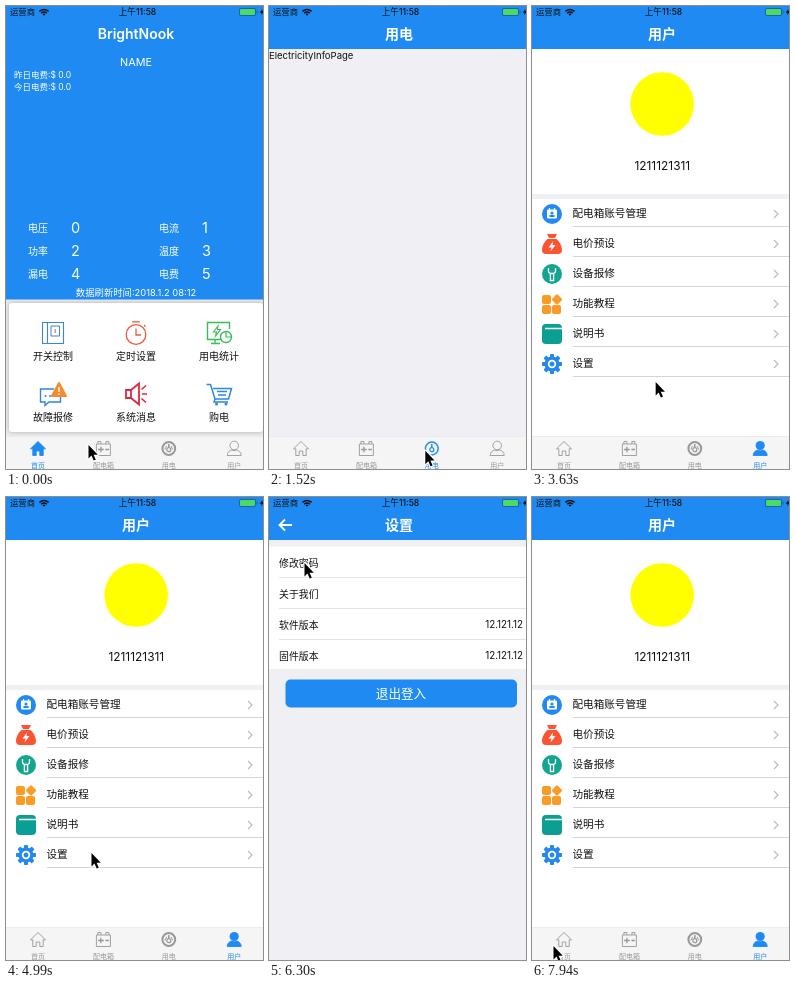
An HTML page with a canvas that plays this animation: 257 by 463 pixels, repeating every 8 s.

```html
<!DOCTYPE html>
<html lang="zh">
<head>
<meta charset="utf-8">
<style>
html, body { margin: 0; width: 100%; height: 100%; overflow: hidden; background: #fff; }
canvas { display: block; width: 257px; height: 463px; }
</style>
</head>
<body>
<canvas id="stage"></canvas>
<script>
const W = 257, H = 463, LOOP = 8000;
const BLUE = '#1f8bf2', GREY = '#efeff4', LINE = '#d4d4d6', INK = '#111', DIM = '#98989a';
const FONT = 'Inter, "Noto Sans CJK SC", "Noto Sans CJK", sans-serif';
const canvas = document.getElementById('stage');
const c = canvas.getContext('2d');
const dpr = window.devicePixelRatio || 1;
canvas.width = W * dpr;
canvas.height = H * dpr;

function rect(x, y, w, h, color, r = 0) {
  c.fillStyle = color;
  c.beginPath();
  c.roundRect(x, y, w, h, r);
  c.fill();
}

function disc(x, y, r, color) {
  c.fillStyle = color;
  c.beginPath();
  c.arc(x, y, r, 0, 7);
  c.fill();
}

function rule(x, y, color = LINE) {
  rect(x, y, W - x, 1, color);
}

// y is the vertical middle of the glyphs
function text(s, x, y, size, color = INK, align = 'left', weight = 400) {
  c.font = `${weight} ${size}px ${FONT}`;
  c.fillStyle = color;
  c.textAlign = align;
  c.fillText(s, x, y + size * 0.37);
}

function at(x, y, draw) {
  c.save();
  c.translate(x, y);
  draw();
  c.restore();
}

function stroke(d, color, w = 1) {
  c.strokeStyle = color;
  c.lineWidth = w;
  c.stroke(new Path2D(d));
}

function fill(d, color) {
  c.fillStyle = color;
  c.fill(new Path2D(d));
}

function ring(x, y, r, color, w = 1) {
  c.strokeStyle = color;
  c.lineWidth = w;
  c.beginPath();
  c.arc(x, y, r, 0, 7);
  c.stroke();
}

const BOLT = 'M1-5L-3.5 1H-.5L-1.5 5L3.5-1.5H.5Z';

// ---- status bar and header ----
function statusBar() {
  text('运营商', 4, 6, 8.4);
  at(38, 9, () => {
    stroke('M-4.6-3.6Q0-7.6 4.6-3.6M-2.8-1.8Q0-4.2 2.8-1.8', INK, 1.4);
    fill('M-1.5-.8Q0-2.2 1.5-.8L0 .8Z', INK);
  });
  text('上午11:58', 131.5, 6, 8.6, INK, 'center', 500);
  rect(233, 2, 17, 8, '#1a63b0', 2);
  rect(234, 3, 15, 6, '#4cd964', 1);
  rect(250.5, 4.5, 1, 3, '#1a63b0');
  at(256, 6, () => { c.scale(0.65, 0.65); fill(BOLT, INK); });
}

function title(s, alpha = 1) {
  c.globalAlpha = alpha;
  text(s, 130, 28, 14, '#fff', 'center', 600);
  c.globalAlpha = 1;
}

function header(page, push) {
  const late = Math.max(0, push * 2 - 1);
  rect(0, 0, W, 43, BLUE);
  statusBar();
  if (page < 3) title(['BrightNook', '配电箱', '用电'][page]);
  else {
    title('用户', 1 - push);
    title('设置', late);
  }
  if (page === 1) stroke('M237 27.5H250M243.5 21V34', '#fff', 1.1);
  if (late) {
    c.globalAlpha = late;
    stroke('M23 28H10.5M16 22.5L10.5 28L16 33.5', '#fff', 1.8);
    c.globalAlpha = 1;
  }
}

// ---- tab bar ----
const tabIcons = [
  (col, on) => {
    const d = 'M-7.5 .3L0-7L7.5 .3H5.2V7H1.8V2.5H-1.8V7H-5.2V.3Z';
    if (on) fill(d, col);
    stroke(d, col, 0.9);
  },
  (col, on) => {
    const body = 'M-7-4.5H7V7H-7ZM-5.5-4.5V-7H-2.5V-4.5M2.5-4.5V-7H5.5V-4.5';
    if (on) fill(body, col);
    stroke(body, col, 0.9);
    stroke('M-5.3 1H.3M-2.5-1.8V3.8M2 1H5.5', on ? '#fff' : col, 1.3);
  },
  (col, on) => {
    ring(0, 0, 6.4, col, on ? 1.5 : 2);
    ring(0, 1.2, 2, col, 1.2);
    stroke('M0-4.5V-.5', col, 1.5);
    if (!on) stroke('M-4 1L-2.2-2.6M4 1L2.2-2.6', col);
  },
  (col, on) => {
    const body = 'M-7 7C-7 3.6-4.5 2-2.4 1.5Q0 3 2.4 1.5C4.5 2 7 3.6 7 7Z';
    if (on) {
      disc(0, -3, 4.6, col);
      fill(body, col);
    } else ring(0, -3, 4.3, col, 0.9);
    stroke(body, col, 0.9);
  }
];

function tabBar(page) {
  rect(0, 430, W, 33, '#f5f5f6');
  rule(0, 430, '#ececee');
  ['首页', '配电箱', '用电', '用户'].forEach((label, i) => {
    const x = 32 + i * 65.4, col = i === page ? BLUE : DIM;
    at(x, 442.5, () => tabIcons[i](col, i === page));
    text(label, x, 459, 7, col, 'center');
  });
}

// ---- home ----
const homeIcons = [
  () => {
    stroke('M-10.5-10.5H10.5V10.5H-10.5ZM-5.5-10V10', '#3b86d8', 1.1);
    stroke('M-2-7H6.5V3H-2Z', '#3b86d8');
    stroke('M2.2-4V0', '#e5687a', 1.2);
  },
  () => {
    ring(0, 1.5, 9.8, '#ee5a3d', 1.3);
    stroke('M-4-11.2H4M0-4.5V2H5M8-8L9.5-6.5', '#ee5a3d', 1.3);
  },
  () => {
    stroke('M2 6.5H-11.5V-10.5H10.5V-4M-8 10.5H1M-4 6.5V10', '#36bf55', 1.4);
    at(-2, -2, () => stroke(BOLT, '#36bf55', 1.1));
    ring(7, 4, 5.5, '#36bf55', 1.4);
    stroke('M7-1V4H12', '#36bf55', 1.2);
  },
  () => {
    stroke('M1-5H-12.5V8H-8V11.5L-4 8H7.5V1', '#2d86df', 1.4);
    [-7.5, -3, 1.5].forEach(x => disc(x, 2, 1, '#2d86df'));
    c.lineJoin = 'round';
    fill('M6-11L13 2H-1Z', '#f78a2b');
    stroke('M6-11L13 2H-1Z', '#f78a2b', 2);
    stroke('M6-7V-2M6-.5V1', '#fff', 1.4);
  },
  () => {
    stroke('M-10-4H-5L3-10.5V10.5L-5 4H-10ZM-5-4V4', '#e0283e', 1.8);
    stroke('M5.5-4.5L10-8.5M6 0H11M5.5 4.5L10 8.5', '#e0283e', 1.6);
  },
  () => {
    stroke('M-12.5-9.5H-8.5L-4 5H9.5L12.5-5.5H-6M-4 5L-5 8H9', '#2d86df', 1.5);
    stroke('M-2-2.5H8M-1 1H7', '#2d86df', 1.3);
    disc(-2.5, 10, 1.5, '#2d86df');
    disc(7, 10, 1.5, '#2d86df');
  }
];

function home() {
  rect(0, 43, W, 251, BLUE);
  rect(0, 293.5, W, 170, '#ececee');
  text('NAME', 130, 56.5, 10.8, '#fff', 'center');
  text('昨日电费:$ 0.0', 8, 69, 8.5, '#fff');
  text('今日电费:$ 0.0', 8, 81, 8.5, '#fff');
  ['电压', '电流', '功率', '温度', '漏电', '电费'].forEach((s, i) => {
    const x = i % 2 * 131, y = 222 + (i >> 1) * 23;
    text(s, 22 + x, y, 10, '#fff');
    text(i, 65 + x, y, 14.5, '#fff');
  });
  text('数据刷新时间:2018.1.2 08:12', 130, 287, 9.35, '#fff', 'center');
  c.save();
  c.shadowColor = 'rgba(0,0,0,.28)';
  c.shadowBlur = 4 * dpr;
  rect(3, 297, 254, 129, '#fff', 3);
  c.restore();
  ['开关控制', '定时设置', '用电统计', '故障报修', '系统消息', '购电'].forEach((s, i) => {
    const x = 47 + i % 3 * 83, y = 327 + (i > 2 ? 61 : 0);
    at(x, y, homeIcons[i]);
    text(s, x, y + 23, 10, INK, 'center');
  });
}

// ---- boxes ----
function chevron(y) {
  stroke(`M242 ${y - 4}L246 ${y}L242 ${y + 4}`, '#b9b9bd', 1.1);
}

function boxes() {
  rect(0, 43, W, 420, '#fff');
  rect(0, 43, W, 6.5, GREY);
  rect(0, 79.5, W, 3.5, GREY);
  rect(10, 54, 20, 20, '#e79a2a', 4);
  at(20, 64, () => {
    stroke('M0-3V3M-5 3V0H5V3M-1.7-6H1.7V-3H-1.7Z', '#fdeccb', 0.9);
    [-5, 0, 5].forEach(x => stroke(`M${x - 1.4} 3H${x + 1.4}V5.5H${x - 1.4}Z`, '#fdeccb', 0.9));
  });
  rect(10, 87, 20, 20, '#12c645', 4);
  at(20, 97, () => stroke('M-6 1L-3.5-5H3.5L6 1V5H-6ZM-6 1H6M2 3H4', '#fff', 1.1));
  text('配电箱组 8', 40.5, 64.5, 10.4);
  text('配电箱', 40.5, 97, 10.4);
  chevron(64.5);
  ['XXN', '设备6', '时空', '设备5'].forEach((s, i) => text(s, 38, 127.5 + i * 30, 10.4));
  rule(41, 110);
  [142, 172, 232].forEach(y => rule(38, y));
  at(241, 157.5, () => {
    c.rotate(-Math.PI / 4);
    c.strokeStyle = '#4ccb68';
    c.lineWidth = 1;
    for (const x of [-7.5, -1]) {
      c.beginPath();
      c.roundRect(x, -2.4, 8.5, 4.8, 2.4);
      c.stroke();
    }
  });
}

function power() {
  rect(0, 43, W, 420, GREY);
  text('ElectricityInfoPage', 0, 49, 9.5);
}

// ---- user ----
const userIcons = [
  () => {
    disc(0, 0, 10, '#2389ef');
    rect(-5, -4.5, 10, 9, '#fff', 1);
    disc(0, -1, 1.6, '#2389ef');
    rect(-2.8, 1, 5.6, 2, '#2389ef', 1);
    stroke('M-2.5-6V-3.5M2.5-6V-3.5', '#fff', 1.2);
  },
  () => {
    fill('M-5-10H5L3-6C8-3 10 3 10 6Q10 10 6 10H-6Q-10 10-10 6C-10 3-8-3-3-6Z', '#fb5433');
    stroke('M-4-5.5H4', '#fff', 1);
    at(0, 2.5, () => fill(BOLT, '#fff'));
  },
  () => {
    disc(0, 0, 10, '#13a58f');
    stroke('M-3.5-6V-3Q-3.5-.5 0-.5T3.5-3V-6M-1.6 0V6.5H1.6V0', '#fff', 1.3);
  },
  () => {
    [[-10, -9], [-10, 1], [0, 1]].forEach(([x, y]) => rect(x, y, 9, 9, '#f99b24', 2));
    at(5, -4.5, () => { c.rotate(Math.PI / 4); rect(-4, -4, 8, 8, '#f99b24', 1.5); });
  },
  () => {
    rect(-10, -10, 20, 20, '#0b9f93', 4);
    stroke('M-7-5.5H10', '#fff', 1.5);
  },
  () => {
    for (let i = 0; i < 8; i++) {
      rect(-2, -10, 4, 6, '#2389ef', 0.8);
      c.rotate(Math.PI / 4);
    }
    disc(0, 0, 7.6, '#2389ef');
    ring(0, 0, 3.3, '#fff', 1.8);
  }
];

function user() {
  rect(0, 43, W, 420, '#fff');
  disc(130.2, 98, 31.8, '#ff0');
  text('1211121311', 130.3, 160, 11.9, INK, 'center');
  rect(0, 188, W, 5, GREY);
  ['配电箱账号管理', '电价预设', '设备报修', '功能教程', '说明书', '设置'].forEach((s, i) => {
    const y = 207 + i * 30;
    at(20, y + 1, userIcons[i]);
    text(s, 40.5, y, 10.6);
    chevron(y + 1);
    rule(41, y + 13);
  });
}

// ---- settings ----
function settings() {
  c.save();
  c.shadowColor = 'rgba(0,0,0,.2)';
  c.shadowBlur = 6 * dpr;
  rect(0, 43, W, 420, GREY);
  c.restore();
  rect(0, 49.5, W, 122.5, '#fff');
  ['修改密码', '关于我们', '软件版本', '固件版本'].forEach((s, i) => {
    const y = 66 + i * 31;
    text(s, 10, y, 9.9);
    if (i > 1) text('12.121.12', 254, y - 1, 9.8, INK, 'right');
    if (i < 3) rule(10, y + 14, '#e3e3e5');
  });
  rect(16.5, 182.5, 231.5, 28, BLUE, 5);
  text('退出登入', 132, 196.5, 12.6, '#fff', 'center');
}

// ---- motion ----
// time, x, y of the pointer tip
const path = [
  [10, 82, 438], [300, 100, 447], [820, 100, 447], [1040, 152, 444],
  [1420, 152, 444], [2090, 214, 439], [2160, 214, 439], [2330, 221, 438],
  [2760, 221, 438], [2990, 140, 240], [3170, 140, 240], [3280, 122, 329],
  [3420, 122, 329], [3800, 124, 408], [4220, 86, 345], [4340, 83, 338],
  [4820, 83, 338], [4990, 85, 355], [5650, 85, 355], [6130, 67, 67],
  [6300, 35, 65], [6770, 14, 27], [7200, 14, 27], [7760, 19, 443], [7940, 21, 448]
];

function pointer(t) {
  let i = path.findIndex(k => k[0] > t);
  if (i < 0) i = path.length;
  const a = path[Math.max(0, i - 1)], b = path[Math.min(i, path.length - 1)];
  let k = b[0] > a[0] ? (t - a[0]) / (b[0] - a[0]) : 0;
  k = k * k * (3 - 2 * k);
  at(a[1] + (b[1] - a[1]) * k, a[2] + (b[2] - a[2]) * k, () => {
    const d = 'M.5 1V14.5L3.5 11.6L5.7 16.6L7.8 15.7L5.6 10.7H9.8Z';
    c.lineJoin = 'round';
    stroke(d, '#fff', 2.4);
    fill(d, '#000');
  });
}

// cubic-bezier(.2833, .99, .3183, .99)
function ease(x) {
  if (x <= 0) return 0;
  if (x >= 1) return 1;
  const curve = (s, p, q) => 3 * (1 - s) * (1 - s) * s * p + 3 * (1 - s) * s * s * q + s * s * s;
  let lo = 0, hi = 1;
  for (let i = 0; i < 24; i++) {
    const mid = (lo + hi) / 2;
    if (curve(mid, 0.2833, 0.3183) < x) lo = mid; else hi = mid;
  }
  return curve(lo, 0.99, 0.99);
}

function pushAt(t) {
  if (t < 5340) return 0;
  return t < 7000 ? ease((t - 5300) / 500) : 1 - ease((t - 6959) / 500);
}

function draw(t) {
  const page = t < 630 ? 0 : t < 1400 ? 1 : t < 2750 ? 2 : 3;
  const push = pushAt(t);
  c.setTransform(dpr, 0, 0, dpr, 0, 0);
  if (page < 3) [home, boxes, power][page]();
  else {
    at(-0.31 * W * push, 0, user);
    if (push) {
      rect(0, 43, W, 420, `rgba(0,0,0,${0.15 * push})`);
      at(W * (1 - push), 0, settings);
    }
  }
  header(page, push);
  if (t < 5340 || t >= 7000) tabBar(page);
  pointer(t);
}

const start = performance.now();
function frame() {
  draw((performance.now() - start) % LOOP);
  requestAnimationFrame(frame);
}
frame();
</script>
</body>
</html>
```
